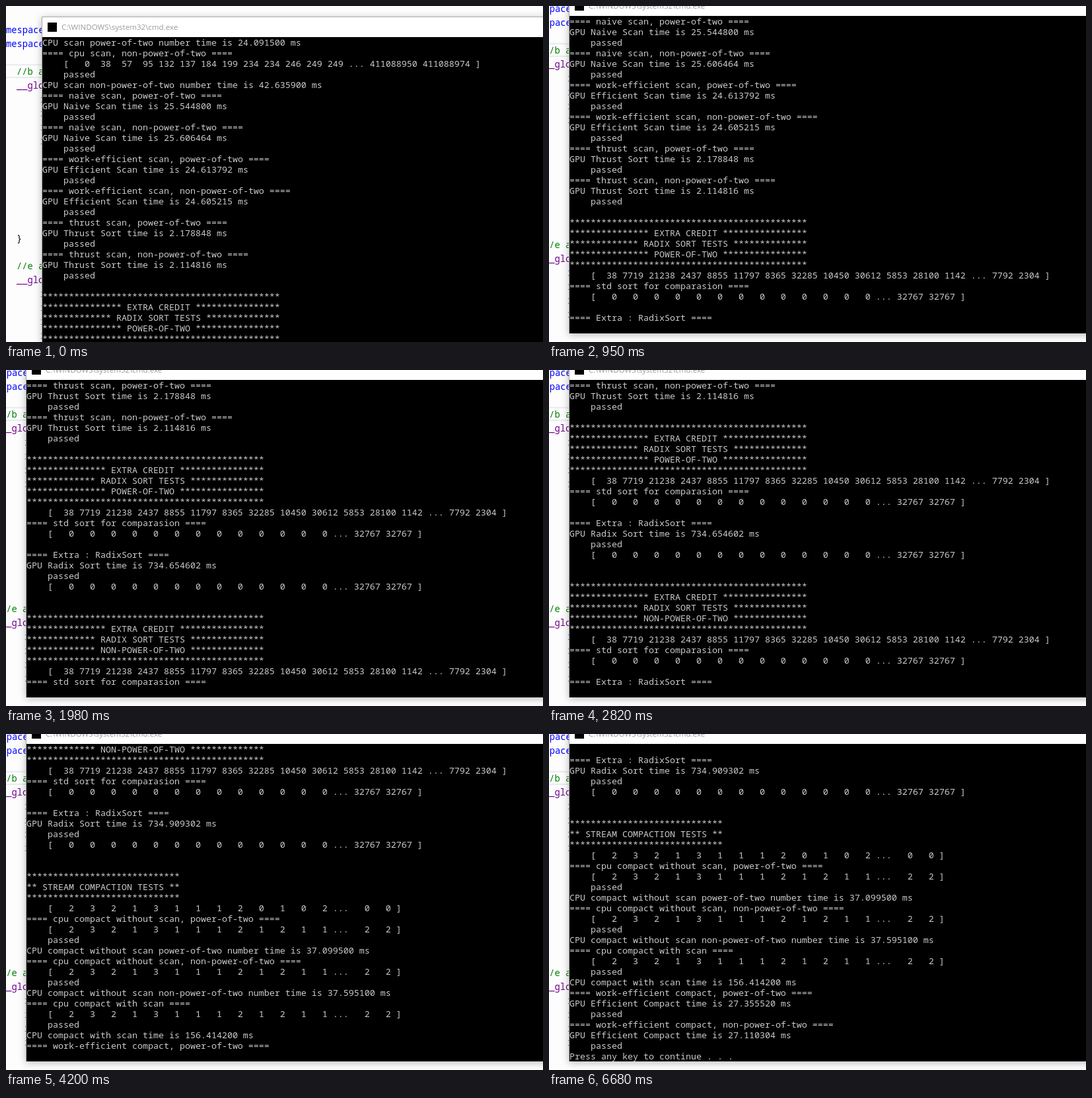
Recreate the animation shown at these times as an HTML page. Size 813 by 508 pixels, loop 8.09 s.

```html
<!DOCTYPE html>
<html lang="en">
<head>
<meta charset="utf-8">
<title>Scan and sort console</title>
<style>
html, body { margin: 0; width: 100%; height: 100%; overflow: hidden; background: #fdfdfd; }
#stage { position: relative; width: 813px; height: 508px; overflow: hidden; }
#desk { position: absolute; left: 0; top: 0; width: 900px; height: 600px; }
.code {
  position: absolute; white-space: pre; line-height: 21px;
  font-family: "Noto Sans Mono", monospace; font-size: 13.75px;
}
#current {
  position: absolute; left: -4px; top: 88px; width: 200px; height: 17px;
  border: 2px solid #eaeaf2;
}
#win {
  position: absolute; left: 54px; top: 16px; width: 860px; height: 511px; box-sizing: border-box;
  background: #fff; border: 1px solid #aaa;
  box-shadow: 0 2px 11px rgba(0, 0, 0, .27);
}
#icon { position: absolute; left: 8px; top: 8px; width: 14px; height: 14px; background: #000; }
#title {
  position: absolute; left: 29px; top: 5px; line-height: 20px; color: #999;
  font-family: "Open Sans", sans-serif; font-size: 11.55px; white-space: pre;
}
#con {
  position: absolute; left: 0; top: 30px; width: 860px; height: 480px; margin: 0;
  overflow: hidden; background: #000; color: #cacaca;
  font-family: "Noto Sans Mono", monospace; font-size: 13.3333px; line-height: 16px;
}
#mouse { position: absolute; left: 0; top: 0; }
</style>
</head>
<body>
<div id="stage">
  <div id="desk">
    <div id="current"></div>
    <div id="win">
      <div id="icon"></div>
      <div id="title">C:\WINDOWS\system32\cmd.exe</div>
      <pre id="con"></pre>
    </div>
  </div>
  <svg id="mouse" width="13" height="20">
    <path d="M.5 .5V16.5L4.2 13L6.6 18.5L9 17.4L6.7 12.2H11.8Z" fill="#fff" stroke="#000"/>
  </svg>
</div>
<script>
const LOOP = 8090, STEP = 130, ROWS = 30;
const $ = id => document.getElementById(id);

// Console text
const head = s => `==== ${s} ====`;
const list = (items, tail) => {
  const cells = s => s.split(' ').map(v => v.padStart(3)).join(' ');
  return `    [ ${cells(items)} ... ${cells(tail)} ]`;
};
const banner = (width, ...titles) => {
  const bar = '*'.repeat(width);
  const mid = titles.map(t => {
    const stars = width - 2 - t.length, left = Math.floor(stars / 2);
    return `${'*'.repeat(left)} ${t} ${'*'.repeat(stars - left)}`;
  });
  return [bar, ...mid, bar];
};
const ok = '    passed';
const P = 'power-of-two', NP = 'non-' + P;
const gpu = (test, label, a, b) => [
  head(`${test}, ${P}`), `GPU ${label} time is ${a} ms`, ok,
  head(`${test}, ${NP}`), `GPU ${label} time is ${b} ms`, ok
];
const sorted = list(Array(13).fill('0').join(' '), '32767 32767');
const radix = (kind, ms) => [
  ...banner(45, 'EXTRA CREDIT', 'RADIX SORT TESTS', kind.toUpperCase()),
  list('38 7719 21238 2437 8855 11797 8365 32285 10450 30612 5853 28100 1142', '7792 2304'),
  head('std sort for comparasion'), sorted, '',
  head('Extra : RadixSort'), `GPU Radix Sort time is ${ms} ms`, ok, sorted, '', ''
];
const compact = (test, label, ms) => [
  head(`cpu compact ${test}`), list('2 3 2 1 3 1 1 1 2 1 2 1 1', '2 2'), ok,
  `CPU compact ${label} time is ${ms} ms`
];
const lines = [
  `CPU scan ${P} number time is 24.091500 ms`,
  head(`cpu scan, ${NP}`),
  list('0 38 57 95 132 137 184 199 234 234 246 249 249', '411088950 411088974'), ok,
  `CPU scan ${NP} number time is 42.635900 ms`,
  ...gpu('naive scan', 'Naive Scan', '25.544800', '25.606464'),
  ...gpu('work-efficient scan', 'Efficient Scan', '24.613792', '24.605215'),
  ...gpu('thrust scan', 'Thrust Sort', '2.178848', '2.114816'),
  '',
  ...radix(P, '734.654602'),
  ...radix(NP, '734.909302'),
  ...banner(29, 'STREAM COMPACTION TESTS'),
  list('2 3 2 1 3 1 1 1 2 0 1 0 2', '0 0'),
  ...compact(`without scan, ${P}`, `without scan ${P} number`, '37.099500'),
  ...compact(`without scan, ${NP}`, `without scan ${NP} number`, '37.595100'),
  ...compact('with scan', 'with scan', '156.414200'),
  ...gpu('work-efficient compact', 'Efficient Compact', '27.355520', '27.110304'),
  'Press any key to continue . . .'
];

// Editor behind the console
function code(row, x, color, text) {
  const el = document.createElement('div');
  el.className = 'code';
  el.textContent = text;
  el.style.cssText = `left:${x}px;top:${25 + row * 21}px;color:${color}`;
  $('desk').insertBefore(el, $('win'));
}
const BLUE = '#0000ff', INDENT = 16;
for (const row of [0, 1]) code(row, 0, BLUE, 'mespace');
for (const [row, name] of [[3, 'b'], [17, 'e']]) {
  code(row, INDENT, '#008000', `//${name} a`);
  code(row + 1, INDENT, '#6f008a', '__glo');
  for (let i = 2; i < 6; i++) code(row + i, 52, BLUE, 'i');
}
code(15, INDENT, '#000', '}');

const steps = ms => Math.floor(ms / STEP);
const move = (el, x, y) => { el.style.transform = `translate(${x}px, ${y}px)`; };

function pan(t) {
  const k = Math.min(3, Math.max(0, steps(t - 120) + 1)) / 3;
  return [Math.round(-24 * k), Math.round(-32 * k)];
}

// Output comes in bursts: start, first and last line; between them the program works
const RATE = 0.035;
const bursts = [
  [0, 28, 28], [120, 30, 30], [950, 33, 33], [1700, 36, 45],
  [2820, 48, 48], [3800, 56, 70], [4470, 73, 75], [4750, 76, 76]
];
function lastLine(t) {
  const [start, first, last] = bursts.findLast(b => b[0] <= t);
  return Math.min(last, Math.round(first + steps(t - start) * STEP * RATE));
}

// The pointer flashes by, then leaves through the bottom edge
function pointer(t) {
  if (t >= 5870 && t < 6010) return [729, 168];
  const k = steps(t - 6290);
  return k >= 0 && k < 3 ? [786 - 6 * k, 482 + 8 * k] : [-50, -50];
}

let shown = -1;
function draw(t) {
  move($('desk'), ...pan(t));
  move($('mouse'), ...pointer(t));
  const last = lastLine(t);
  if (last === shown) return;
  shown = last;
  const top = Math.min(last - ROWS + 2, lines.length - ROWS);
  $('con').textContent = lines.slice(top, last + 1).join('\n');
}

const start = performance.now();
function tick() {
  draw((performance.now() - start) % LOOP);
  requestAnimationFrame(tick);
}
tick();
</script>
</body>
</html>
```
